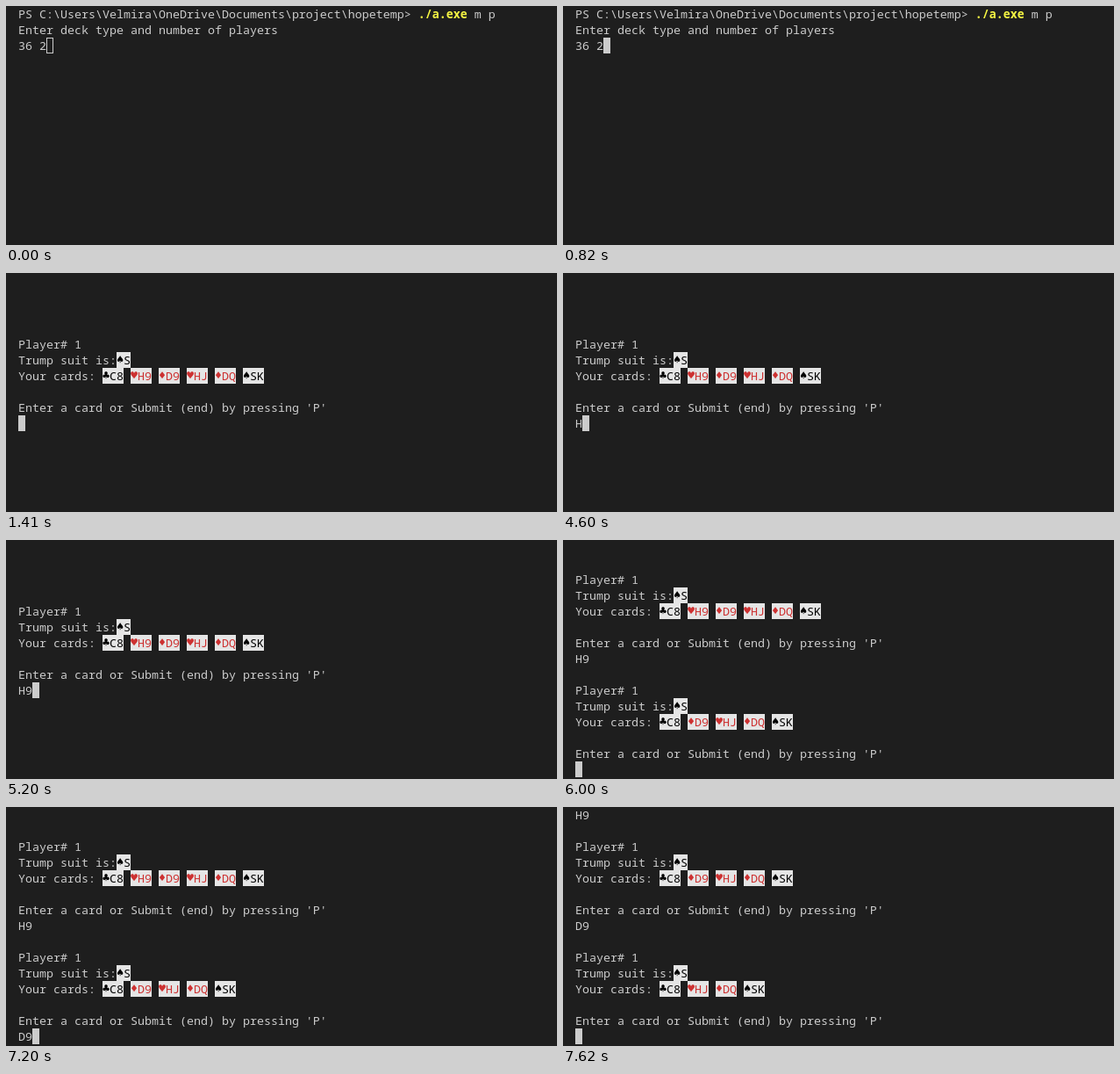
These frames come from a looping animation (628 by 272 pixels, 8 s). An HTML page:

```html
<!DOCTYPE html>
<html lang="en">
<head>
<meta charset="utf-8">
<title>Card game in a terminal</title>
<style>
  html, body {
    margin: 0;
    width: 100%;
    height: 100%;
    overflow: hidden;
    background: #1e1e1e;
  }
  #stage {
    position: relative;
    width: 628px;
    height: 272px;
    overflow: hidden;
    color: #ccc;
    font: 13.333px/18px "Noto Sans Mono", "DejaVu Sans Mono", monospace;
    font-variant-ligatures: none;
  }
  /* Screens are stacked and jump up one stage height at a time. */
  #reel { animation: screens 8s step-end infinite; }
  pre {
    margin: 0;
    padding-left: 14px;
    height: 272px;
    overflow: hidden;
    font: inherit;
  }
  .row { height: 18px; }
  .cmd { color: #f5f543; font-weight: 700; }
  mark, mark i, .typed, .cursor {
    display: inline-block;
    height: 18px;
    vertical-align: top;
  }
  mark { background: #e5e5e5; color: #000; }
  mark.red { color: #cd3131; }
  mark i {
    width: 8px;
    font-family: "DejaVu Sans Mono", monospace;
    font-style: normal;
  }
  .cursor {
    box-sizing: border-box;
    width: 8px;
    border: 1px solid #ccc;
    background: #ccc;
  }
  .focus { animation: focus 8s step-end infinite; }
  .typed { width: 0; overflow: hidden; }
  .first { animation: first 8s step-end infinite; }
  .second { animation: second 8s step-end infinite; }

  @keyframes screens {
    0% { transform: translateY(0); }
    17.625% { transform: translateY(-272px); }
    75% { transform: translateY(-544px); }
    95.25%, 100% { transform: translateY(-816px); }
  }
  @keyframes focus {
    0% { background: transparent; }
    10.25%, 100% { background: #ccc; }
  }
  @keyframes first {
    0% { width: 0; }
    57.5% { width: 8px; }
    65%, 100% { width: 16px; }
  }
  @keyframes second {
    0% { width: 0; }
    85.25% { width: 8px; }
    90%, 100% { width: 16px; }
  }
</style>
</head>
<body>
<div id="stage"><div id="reel"></div></div>
<script>
  const suits = { S: '♠', C: '♣', H: '♥', D: '♦' };
  const cursor = '<span class="cursor"></span>';

  const card = name => {
    const red = 'HD'.includes(name[0]) ? ' class="red"' : '';
    return `<mark${red}><i>${suits[name[0]]}</i>${name}</mark>`;
  };
  const typed = (text, step) => `<span class="typed ${step}">${text}</span>${cursor}`;
  const turn = (hand, entry) => [
    'Player# 1',
    'Trump suit is:' + card('S'),
    'Your cards: ' + hand.split(' ').map(card).join(' '),
    '',
    "Enter a card or Submit (end) by pressing 'P'",
    entry
  ];

  const six = 'C8 H9 D9 HJ DQ SK';
  const five = 'C8 D9 HJ DQ SK';
  const four = 'C8 HJ DQ SK';

  const screens = [
    [
      'PS C:\\Users\\Velmira\\OneDrive\\Documents\\project\\hopetemp&gt; <span class="cmd">./a.exe</span> m p',
      'Enter deck type and number of players',
      '36 2<span class="cursor focus"></span>'
    ],
    ['', '', '', '', ...turn(six, typed('H9', 'first'))],
    ['', '', ...turn(six, 'H9'), '', ...turn(five, typed('D9', 'second'))],
    ['H9', '', ...turn(five, 'D9'), '', ...turn(four, cursor)]
  ];

  document.getElementById('reel').innerHTML = screens.map(rows =>
    '<pre>' + rows.map(row => `<div class="row">${row}</div>`).join('') + '</pre>'
  ).join('');
</script>
</body>
</html>
```
